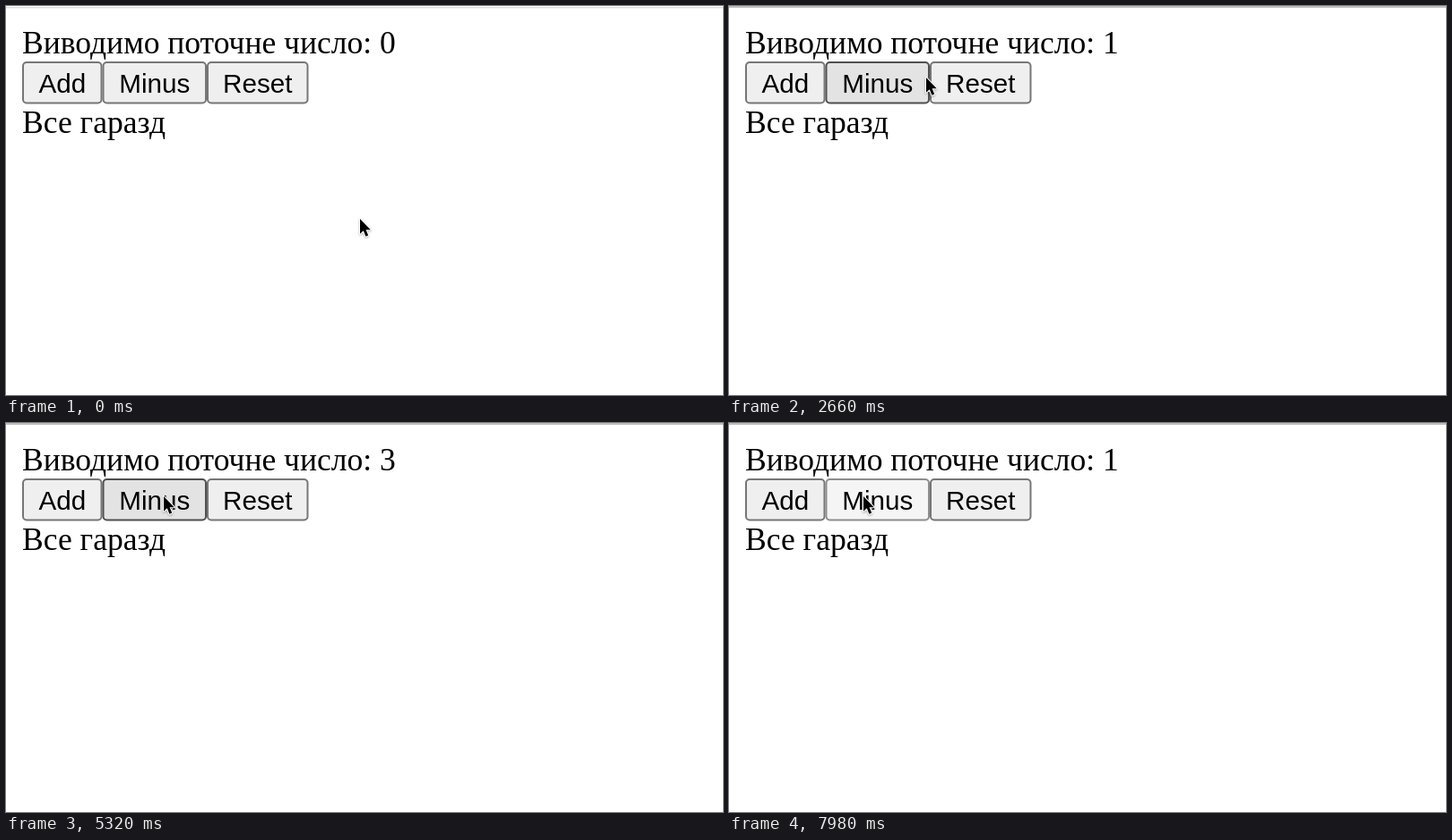
Recreate the animation shown at these times as an HTML page. Size 800 by 435 pixels, loop 8000 ms.

```html
<!DOCTYPE html>
<html lang="uk">
<head>
<meta charset="utf-8">
<style>
  html, body { margin: 0; width: 100%; height: 100%; overflow: hidden; background: #fff; }
  svg { display: block; width: 800px; height: 435px; }
  .page { font: 35.55px "Liberation Serif", serif; }
  .button { font: 29.63px "Liberation Sans", sans-serif; text-anchor: middle; }
  .button rect { fill: #efefef; stroke: #767676; stroke-width: 2; }
  .button.hover rect { fill: #e3e3e3; stroke: #4f4f4f; }
  .button.active rect { fill: #f5f5f5; stroke: #8d8d8d; }
  #cursor { filter: drop-shadow(0 1px 1px rgba(0, 0, 0, .3)); }
</style>
</head>
<body>
<svg viewBox="0 0 800 435">
  <rect id="edge" width="800"/>
  <g class="page">
    <text id="count" x="18" y="53"></text>
    <text x="18" y="142">Все гаразд</text>
  </g>
  <g id="buttons"></g>
  <path id="cursor" d="M0 0V16.8L3.8 13.3L6.4 19.8L9.2 18.6L6.6 12.3H11.8Z"
    stroke="#fff" stroke-width="2" stroke-linejoin="round" paint-order="stroke"/>
</svg>
<script>
const LOOP = 8000, PRESS = 140;
const byId = id => document.getElementById(id);

const buttons = [
  { label: 'Add', left: 18, right: 107.5, apply: n => n + 1 },
  { label: 'Minus', left: 107.5, right: 224, apply: n => n - 1 },
  { label: 'Reset', left: 224, right: 337.5, apply: () => 0 }
];
const [ADD, MINUS] = buttons;

// Release time of each click
const clicks = [
  [MINUS, 840, 1050],
  [ADD, 1820, 2030, 2240],
  [MINUS, 3150, 3360, 3570],
  [ADD, 3920, 4130, 4340, 4550, 4760],
  [MINUS, 5480, 5690],
  [ADD, 6230, 6480, 6860],
  [MINUS, 7350, 7560, 7770, 8050]
].flatMap(([button, ...times]) => times.map(time => ({ button, time })));

// Cursor stops: time, x, y
const path = [
  [0, 395, 238], [70, 395, 238], [700, 160, 86], [1150, 160, 86],
  [1480, 92, 86], [1680, 90, 85], [2300, 90, 85], [2660, 220, 80],
  [2960, 170, 82], [3600, 168, 82], [3850, 66, 82], [4270, 63, 82],
  [4800, 63, 82], [5180, 172, 83], [5320, 176, 82], [5760, 176, 82],
  [6100, 97, 82], [6720, 95, 82], [6900, 95, 82], [7240, 152, 82],
  [7980, 150, 82], [LOOP, 150, 82]
];

byId('buttons').innerHTML = buttons.map(({ label, left, right }) => `
  <g class="button">
    <rect x="${left + 1}" y="63" width="${right - left - 2}" height="45.5" rx="4"/>
    <text x="${(left + right) / 2}" y="97">${label}</text>
  </g>`).join('');
buttons.forEach((button, i) => button.node = byId('buttons').children[i]);

function cursorAt(t) {
  const i = path.findIndex(stop => stop[0] > t);
  const [t0, x0, y0] = path[i - 1], [t1, x1, y1] = path[i];
  const p = (t - t0) / (t1 - t0), ease = p * p * (3 - 2 * p);
  return [x0 + (x1 - x0) * ease, y0 + (y1 - y0) * ease];
}

function draw(t) {
  const [x, y] = cursorAt(t);
  byId('cursor').setAttribute('transform', `translate(${x} ${y})`);

  const count = clicks.filter(c => c.time <= t).reduce((n, c) => c.button.apply(n), 0);
  byId('count').textContent = `Виводимо поточне число: ${count}`;

  for (const button of buttons) {
    const over = x >= button.left && x < button.right && y > 62 && y < 109;
    const pressed = clicks.some(c => c.button === button && t >= c.time - PRESS && t < c.time);
    button.node.setAttribute('class', 'button' + (pressed ? ' active' : over ? ' hover' : ''));
  }

  const early = t < 70, edge = byId('edge');
  edge.setAttribute('y', early ? 1 : 0);
  edge.setAttribute('height', early ? 1.5 : 2);
  edge.setAttribute('fill', early ? '#dedede' : '#bdbdbd');
}

function tick() {
  draw(performance.now() % LOOP);
  requestAnimationFrame(tick);
}
tick();
</script>
</body>
</html>
```
